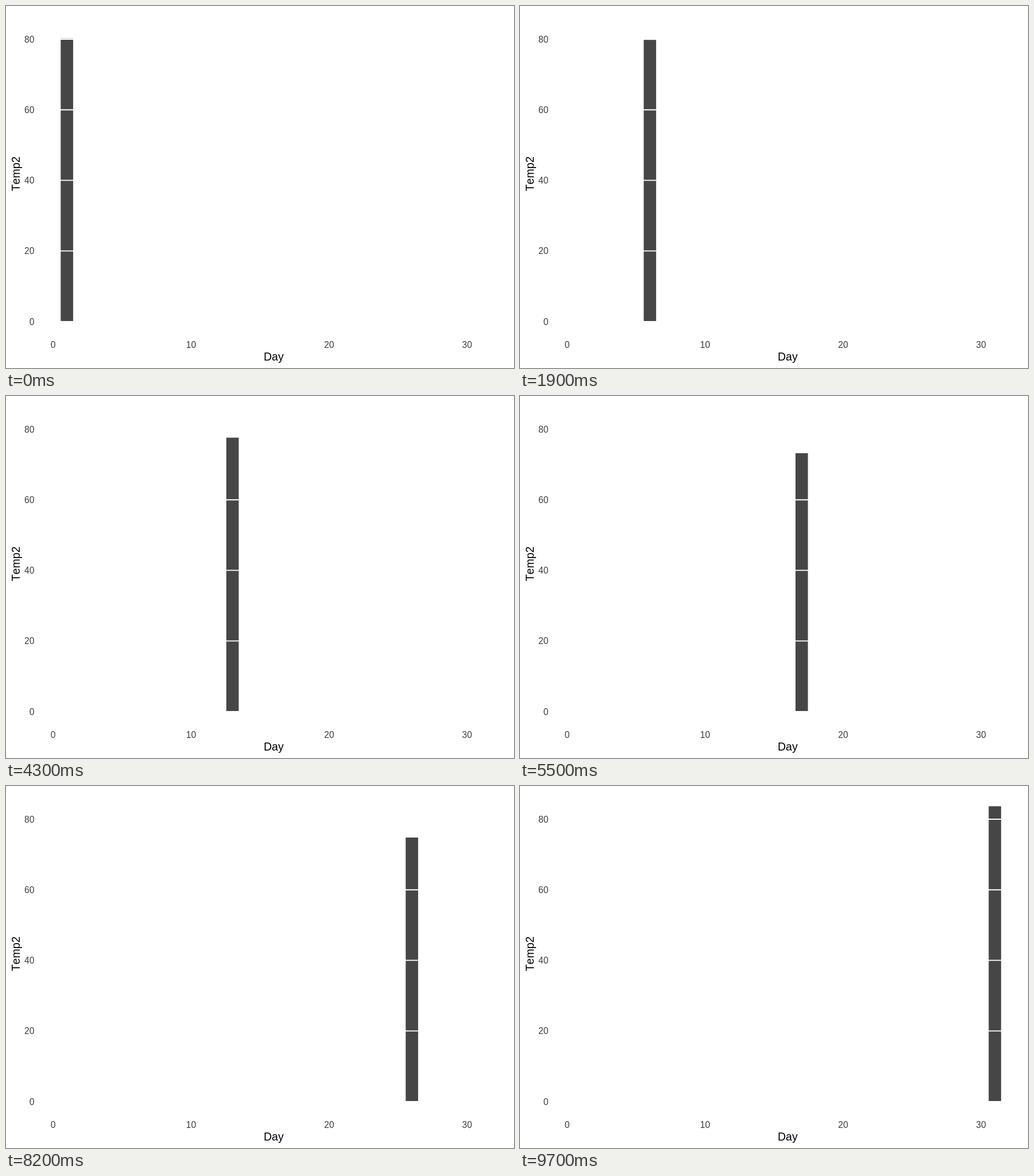
Write an HTML page that moves like this. It is 885x632 px and loops after 10000 ms.

```html
<!DOCTYPE html>
<html lang="en">
<head>
<meta charset="utf-8">
<title>Temperature by day</title>
<style>
  html, body { margin: 0; width: 100%; height: 100%; overflow: hidden; background: #fff; }
  svg { display: block; font: 15.6px "Liberation Sans", Arial, sans-serif; font-kerning: none; }
  .tick { fill: #3c3c3c; }
  .title { font-size: 19.5px; text-anchor: middle; }
</style>
</head>
<body>
<svg id="chart" width="885" height="632" viewBox="0 0 885 632">
  <rect id="bar" fill="#464646"/>
  <text class="title" x="466.3" y="619">Day</text>
  <text class="title" transform="translate(23.8 293) rotate(-90)">Temp2</text>
</svg>
<script>
const chart = document.getElementById('chart');
const bar = document.getElementById('bar');

// Temperature totals of five months for days 1 to 30; day 31 occurs in three
const totals = [401, 404, 397, 409, 396, 399, 404, 406, 408, 410,
                416, 396, 388, 390, 367, 377, 366, 358, 374, 383,
                351, 373, 375, 371, 361, 374, 381, 407, 414, 409];
const temps = [...totals.map(s => s / 5), 251 / 3];

const DAY = 24.04;
const x = day => 82.1 + DAY * day;
const y = temp => 550.9 - 6.162 * temp;

function add(tag, attrs, text = '') {
  const el = document.createElementNS('http://www.w3.org/2000/svg', tag);
  for (const key in attrs) el.setAttribute(key, attrs[key]);
  el.textContent = text;
  chart.append(el);
}

for (let t = 0; t <= 80; t += 20) {
  add('path', { d: `M60 ${y(t)}H870`, stroke: '#fff', 'stroke-width': 1.9 });
  add('text', { class: 'tick', x: 49.4, y: y(t) + 5.6, 'text-anchor': 'end' }, t);
}
for (let d = 0; d <= 30; d += 10) {
  add('text', { class: 'tick', x: x(d), y: 596.6, 'text-anchor': 'middle' }, d);
}

// Early days pass through a halfway pose; from day 9 on the bar jumps
function dayAt(step) {
  if (step >= 31) return 9 + Math.floor((step - 31) / 3);
  const n = step + 1;
  return 1 + Math.floor(n / 4) + (n % 4 === 3 ? 0.5 : 0);
}

function tempAt(day) {
  return (temps[Math.floor(day) - 1] + temps[Math.ceil(day) - 1]) / 2;
}

function draw() {
  const day = dayAt(Math.floor(performance.now() % 10000 / 100));
  const top = y(tempAt(day));
  bar.setAttribute('x', x(day - 0.45));
  bar.setAttribute('width', DAY * 0.9);
  bar.setAttribute('y', top);
  bar.setAttribute('height', y(0) - top);
  requestAnimationFrame(draw);
}
draw();
</script>
</body>
</html>
```
